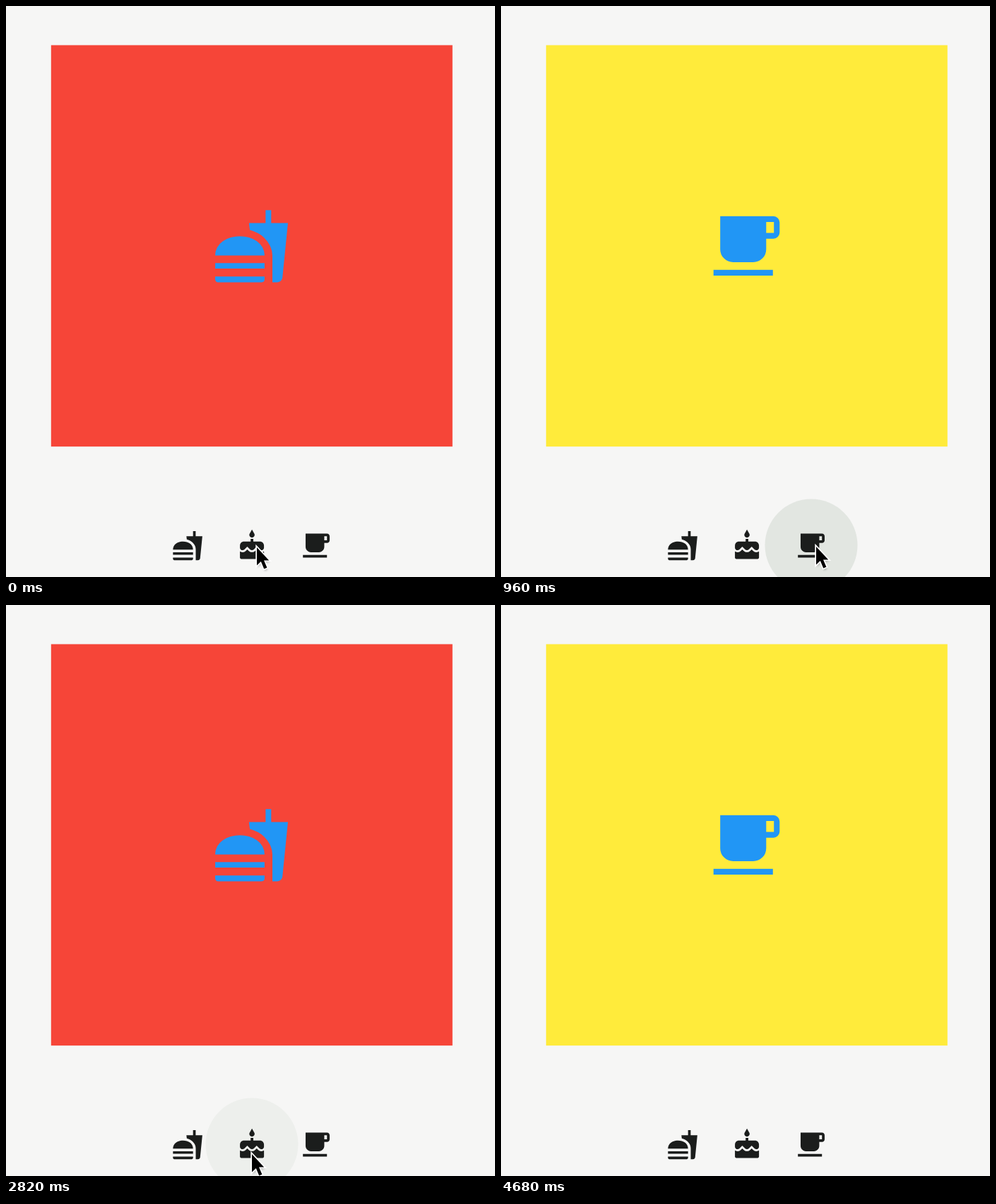
Recreate the animation shown at these times as an HTML page. Size 692 by 809 pixels, loop 5160 ms.

```html
<!DOCTYPE html>
<html lang="en">
<head>
<meta charset="utf-8">
<title>Icon picker</title>
<style>
  html, body { margin: 0; width: 100%; height: 100%; overflow: hidden; background: #f6f6f5; }
  svg { display: block; width: 692px; height: 809px; }
</style>
</head>
<body>
<svg viewBox="0 0 692 809">
  <defs>
    <path id="food" d="M18.06 22.99h1.66c.84 0 1.53-.64 1.63-1.46L23 5.05h-5V1.2h-1.97v3.85h-4.97l.3 2.34c1.71.47 3.31 1.32 4.27 2.26 1.44 1.42 2.43 2.89 2.43 5.29zM1 21.99V21h15.03v.99c0 .55-.45 1-1.01 1H2.01c-.56 0-1.01-.45-1.01-1zm15.03-7c0-8-15.03-8-15.03 0zM1.02 17h15v1.9h-15z"/>
    <path id="cake" d="M12 6c1.11 0 2-.9 2-2 0-.38-.1-.73-.29-1.03L12 0l-1.71 2.97c-.19.3-.29.65-.29 1.03 0 1.1.9 2 2 2zm4.6 9.99l-1.07-1.07-1.08 1.07c-1.3 1.3-3.58 1.31-4.89 0l-1.07-1.07-1.09 1.07C6.75 16.64 5.88 17 4.96 17c-.73 0-1.4-.23-1.96-.61V21c0 .55.45 1 1 1h16c.55 0 1-.45 1-1v-4.61c-.56.38-1.23.61-1.96.61-.92 0-1.79-.36-2.44-1.01zM18 9h-5V7h-2v2H6c-1.66 0-3 1.34-3 3v1.54c0 1.08.88 1.96 1.96 1.96.52 0 1.02-.2 1.38-.57l2.14-2.13 2.13 2.13c.74.74 2.03.74 2.77 0l2.14-2.13 2.13 2.13c.37.37.86.57 1.38.57 1.08 0 1.96-.88 1.96-1.96V12c0-1.66-1.34-3-3-3z"/>
    <path id="cup" d="M20 3H4v10c0 2.21 1.79 4 4 4h6c2.21 0 4-1.79 4-4v-3h2c1.11 0 2-.9 2-2V5c0-1.11-.89-2-2-2zm0 5h-2V5h2zM2 21h18v-2H2z"/>
    <path id="arrow" d="M0 0V25.5L5.8 20 10.2 30.5 14.4 28.7 10 18.4H17.2Z"/>
    <filter id="soft" x="-50%" y="-50%" width="200%" height="200%">
      <feGaussianBlur stdDeviation="1.5"/>
    </filter>
  </defs>
  <rect id="panel" x="63.8" y="55.5" width="568" height="568.7"/>
  <use id="big" fill="#2196f5" stroke-width=".3" transform="translate(290.5 282.9) scale(4.75)"/>
  <circle id="ripple" cy="764" r="65.5" fill="#244c28"/>
  <g id="buttons" fill="#1b1d1c"></g>
  <g id="cursor">
    <use href="#arrow" x="1" y="3" opacity=".25" filter="url(#soft)"/>
    <use href="#arrow" stroke="#fff" stroke-width="3.4" paint-order="stroke"/>
  </g>
</svg>
<script>
const LOOP = 5160, STEP = 60, FADE = 240, SWITCH = 50;
const $ = id => document.getElementById(id);
const panel = $('panel'), big = $('big'), ripple = $('ripple'), cursor = $('cursor');

const items = {
  food: { color: '#f64538', x: 257 },
  cake: { color: '#4caf50', x: 348 },
  cup: { color: '#ffeb3b', x: 439 }
};

const presses = [
  { at: 10, name: 'cake' },
  { at: 900, name: 'cup' },
  { at: 1740, name: 'food' },
  { at: 2820, name: 'cake' },
  { at: 3840, name: 'cup' }
];

// Each move starts where the one before it ended.
const home = { x: 355, y: 767 };
const moves = [
  { from: 240, to: 620, x: 446, y: 766 },
  { from: 1080, to: 1500, x: 262, y: 769 },
  { from: 1920, to: 2340, x: 349, y: 790 },
  { from: 2520, to: 2760, x: 348, y: 778 },
  { from: 3060, to: 3600, x: 430, y: 770 },
  { from: 4440, to: 4680, x: 240, y: 816 }
];

const easeInOut = k => k < 0.5 ? 4 * k ** 3 : 1 - 4 * (1 - k) ** 3;

function pointerAt(t) {
  let { x, y } = home;
  for (const move of moves) {
    if (t < move.from) break;
    const k = easeInOut(Math.min(1, (t - move.from) / (move.to - move.from)));
    const dx = move.x - x, dy = move.y - y;
    const sag = 0.06 * Math.abs(dx) * Math.sin(Math.PI * k);
    x += dx * k;
    y += dy * k + sag;
  }
  return [x, y];
}

// Quick rise, short hold, then fade to nothing at FADE.
function rippleStrength(age) {
  return Math.min(1, 1.2 * Math.sin(Math.PI * (age + 30) / (FADE + 30)));
}

function draw(t) {
  const shown = presses.filter(p => t >= p.at + SWITCH).pop()?.name ?? 'food';
  panel.setAttribute('fill', items[shown].color);
  big.setAttribute('href', '#' + shown);
  big.setAttribute('stroke', items[shown].color);

  const press = presses.find(p => t >= p.at && t < p.at + FADE);
  ripple.setAttribute('opacity', press ? 0.095 * rippleStrength(t - press.at) : 0);
  if (press) ripple.setAttribute('cx', items[press.name].x);

  cursor.setAttribute('transform', `translate(${pointerAt(t)})`);
}

for (const name in items) {
  $('buttons').innerHTML +=
    `<use href="#${name}" transform="translate(${items[name].x - 22.6} 741.8) scale(1.89)"/>`;
}

const start = performance.now();
function tick() {
  const t = (performance.now() - start) % LOOP;
  draw(Math.floor(t / STEP) * STEP);
  requestAnimationFrame(tick);
}
tick();
</script>
</body>
</html>
```
